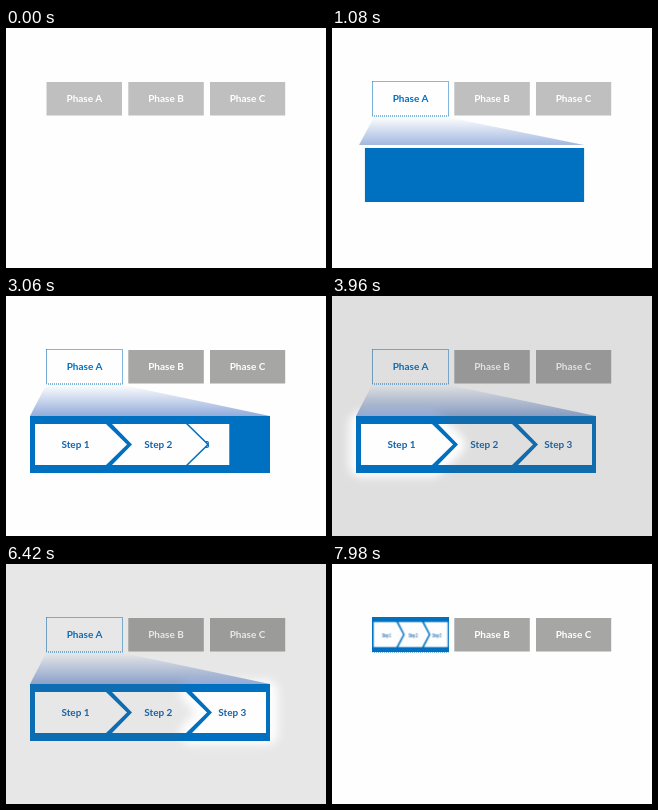
Recreate the animation shown at these times as an HTML page. Size 320 px wide and 240 px high, loop 8 s.

```html
<!DOCTYPE html>
<html lang="en">
<head>
<meta charset="utf-8">
<title>Phases and steps</title>
<style>
  html, body { margin: 0; width: 100%; height: 100%; overflow: hidden; background: #fefefe; }
  svg { display: block; width: 100vw; height: 100vh; }
  text { font: 700 10px Lato, "Open Sans", sans-serif; text-anchor: middle; }
  .anim { animation: 8s linear infinite; }
  .blue { fill: #0070c0; }
  .light { fill: #fff; }
  .step use { fill: #fefefe; stroke: #0070c0; stroke-width: 3; paint-order: stroke; }
  .step text { fill: #1464ae; }
  .hole { fill: #000; stroke: #000; stroke-width: 24; stroke-linejoin: round; filter: url(#soft); }

  .idle { fill: #bfbfbf; animation-name: darken; }
  .active { animation-name: activate; }
  .panel { animation-name: grow; }
  .beam { animation-name: beam; transform-origin: 72px 89px; }
  .s1 { animation-name: slide1; }
  .s2 { animation-name: slide2; }
  .s3 { animation-name: slide3; }
  .dim { fill: #5e5e5e; animation-name: dim; }
  .h1 { animation-name: spot1; }
  .h2 { animation-name: spot2; }
  .h3 { animation-name: spot3; }
  .detail { animation-name: shrink; }

  @keyframes darken {
    0%, 13.5% { fill: #bfbfbf; }
    26%, 100% { fill: #a6a6a5; }
  }
  @keyframes activate {
    0%, 1.125% { opacity: 0; }
    7.5%, 100% { opacity: 1; }
  }
  @keyframes grow {
    0%, 9.375% { opacity: 0; transform: translate(40px, 54px) scale(.32, .6) translate(-24px, -120px); }
    10.5% { opacity: 1; }
    13.5% { transform: translate(33px, 120px) scale(.9125, .947) translate(-24px, -120px); }
    15%, 100% { opacity: 1; transform: translate(24px, 120px) scale(1, 1) translate(-24px, -120px); }
  }
  @keyframes beam {
    0%, 9.75% { opacity: 0; transform: scale(.6, .3); }
    13.5% { opacity: .85; transform: scale(.9375, .9); }
    15%, 84% { opacity: 1; transform: scale(1, 1); }
    87.75%, 100% { opacity: 0; transform: scale(1, 1); }
  }
  @keyframes slide1 {
    0%, 19.5% { transform: translateX(-135px); }
    30%, 100% { transform: translateX(0); }
  }
  @keyframes slide2 {
    0%, 29.99% { opacity: 0; transform: translateX(-77px); }
    30% { opacity: 1; transform: translateX(-77px); }
    35.25%, 100% { opacity: 1; transform: translateX(0); }
  }
  @keyframes slide3 {
    0%, 35.62% { opacity: 0; transform: translateX(-80px); }
    35.625% { opacity: 1; transform: translateX(-80px); }
    40.5%, 100% { opacity: 1; transform: translateX(0); }
  }
  @keyframes dim {
    0%, 40.5% { opacity: 0; }
    54%, 76.5% { opacity: .28; }
    84%, 100% { opacity: 0; }
  }
  @keyframes spot1 {
    0%, 61.5% { opacity: 1; }
    65.25%, 100% { opacity: 0; }
  }
  @keyframes spot2 {
    0%, 61.5% { opacity: 0; }
    65.25%, 69% { opacity: 1; }
    72.75%, 100% { opacity: 0; }
  }
  @keyframes spot3 {
    0%, 69% { opacity: 0; }
    72.75%, 100% { opacity: 1; }
  }
  @keyframes shrink {
    0%, 84% {
      transform: translate(24px, 120px) scale(1, 1) translate(-24px, -120px);
      animation-timing-function: ease-in-out;
    }
    93.75%, 100% { transform: translate(40px, 53px) scale(.3208, .614) translate(-24px, -120px); }
  }
</style>
</head>
<body>
<svg viewBox="0 0 320 240" preserveAspectRatio="none">
  <defs>
    <polygon id="p1" points="29,128 100,128 121,148.5 100,169 29,169"/>
    <polygon id="p2" points="106,128 180,128 201,148.5 180,169 106,169 126,148.5"/>
    <polygon id="p3" points="186,128 260,128 260,169 186,169 206,148.5"/>
    <linearGradient id="ray" x1="0" y1="0" x2="0" y2="1">
      <stop offset="0" stop-color="#fefefe"/>
      <stop offset="1" stop-color="#93acdb"/>
    </linearGradient>
    <linearGradient id="fade" gradientUnits="userSpaceOnUse" x1="16" y1="0" x2="29" y2="0">
      <stop offset="0" stop-color="#000"/>
      <stop offset="1" stop-color="#fff"/>
    </linearGradient>
    <filter id="soft" filterUnits="userSpaceOnUse" x="-20" y="80" width="360" height="140">
      <feGaussianBlur stdDeviation="4"/>
    </filter>
    <mask id="edge" maskUnits="userSpaceOnUse" x="0" y="0" width="320" height="240">
      <rect width="320" height="240" fill="url(#fade)"/>
    </mask>
    <mask id="spot" maskUnits="userSpaceOnUse" x="0" y="0" width="320" height="240">
      <rect width="320" height="240" fill="#fff"/>
      <use href="#p1" class="anim hole h1"/>
      <use href="#p2" class="anim hole h2"/>
      <use href="#p3" class="anim hole h3"/>
    </mask>
  </defs>

  <rect width="320" height="240" fill="#fefefe"/>

  <rect class="anim idle" x="40.5" y="54" width="75.5" height="33.5"/>
  <rect class="anim idle" x="122.3" y="54" width="75.5" height="33.5"/>
  <rect class="anim idle" x="204" y="54" width="75.2" height="33.5"/>
  <text class="light" x="78.3" y="74.3">Phase A</text>
  <text class="light" x="160" y="74.3">Phase B</text>
  <text class="light" x="241.5" y="74.3">Phase C</text>

  <g class="anim active">
    <rect x="40.5" y="53.5" width="76" height="34.5" fill="#fefefe" stroke="#0070c0" stroke-dasharray="1 1"/>
    <text class="blue" x="78.5" y="74.3">Phase A</text>
  </g>

  <polygon class="anim beam" points="40,89 117,89 264,120 24,120" fill="url(#ray)"/>

  <g class="anim detail">
    <rect class="anim panel blue" x="24" y="120" width="240" height="57"/>
    <g mask="url(#edge)">
      <g class="anim step s3"><use href="#p3"/><text x="226.3" y="152.3">Step 3</text></g>
      <g class="anim step s2"><use href="#p2"/><text x="152.3" y="152.3">Step 2</text></g>
      <g class="anim step s1"><use href="#p1"/><text x="69.5" y="152.3">Step 1</text></g>
    </g>
  </g>

  <g mask="url(#spot)">
    <rect class="anim dim" width="320" height="240"/>
  </g>
</svg>
</body>
</html>
```
